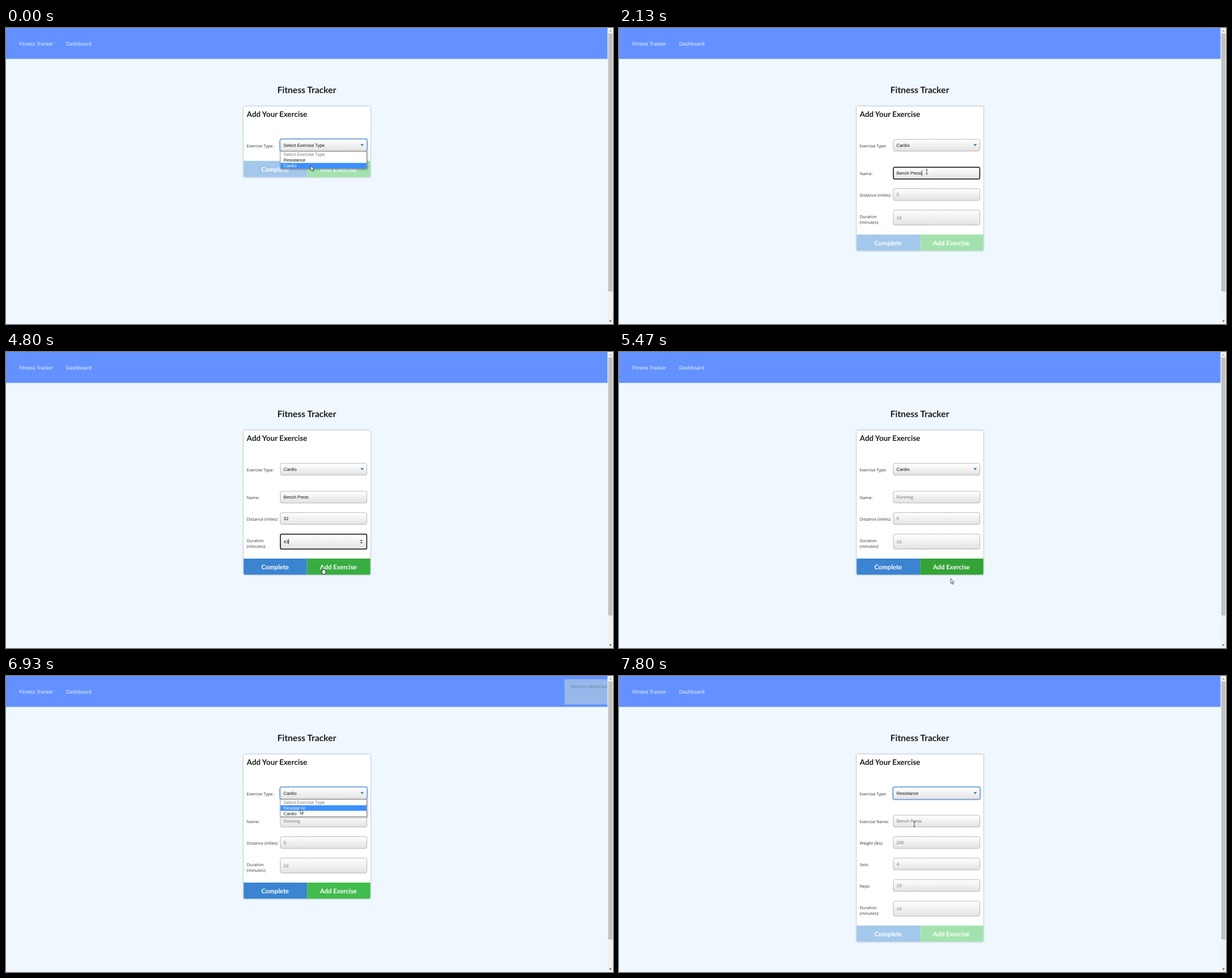
An HTML page for the animation above (8 s loop, 1071 by 523 pixels).

```html
<!DOCTYPE html>
<html lang="en">
<head>
<meta charset="utf-8">
<title>Fitness Tracker</title>
<style>
  html, body { margin: 0; width: 100%; height: 100%; overflow: hidden; background: #f0f8ff; }
  svg { display: block; width: 100%; height: 100%; }
  text { text-rendering: geometricPrecision; white-space: pre; }
  .ui { font-family: "Open Sans", "Noto Sans", sans-serif; }
  .head { font-family: Lato, sans-serif; font-weight: 700; }
  .field { font: 7.8px "Liberation Sans", Arial, sans-serif; }
  .card { filter: drop-shadow(0 .8px 1.4px rgba(40, 40, 60, .45)); }
  .menu { filter: drop-shadow(1px 1.5px 1.5px rgba(0, 0, 0, .4)); }
</style>
</head>
<body>
<svg id="stage" viewBox="0 0 1071 523" preserveAspectRatio="none">
  <defs>
    <linearGradient id="face" x2="0" y2="1">
      <stop offset="0" stop-color="#fff"/>
      <stop offset="1" stop-color="#e3e3e3"/>
    </linearGradient>
  </defs>
  <rect width="1071" height="523" fill="#f0f8ff"/>
  <rect width="1061.5" height="54.6" fill="#6391ff"/>
  <g class="ui" font-size="8.7" fill="#fff">
    <text x="23.4" y="31">Fitness Tracker</text>
    <text x="106" y="31">Dashboard</text>
  </g>
  <text class="head" x="530.6" y="115.3" font-size="15.6" text-anchor="middle" fill="#1b1c1d">Fitness Tracker</text>
  <g id="form"></g>
  <g id="toast">
    <rect x="888.7" y="5.6" width="167.4" height="44.6" rx="2" fill="#dbead0"/>
    <text class="ui" x="899.8" y="20.7" font-size="6.92" fill="#4a6b2a">Workout Added Successfully!</text>
  </g>
  <rect x="1061.6" width="9.4" height="523" fill="#f1f1f1"/>
  <rect x="1062.7" y="9.5" width="7.3" height="456" fill="#c1c1c1"/>
  <path d="M1064.2 6.2l2.2-2.6 2.2 2.6z" fill="#a3a3a3"/>
  <path d="M1064.2 516.8l2.2 2.6 2.2-2.6z" fill="#505050"/>
  <g id="cursor"></g>
</svg>
<script>
const LOOP = 8000, RATE = 15;
const $ = id => document.getElementById(id);
const clamp = v => Math.max(0, Math.min(1, v));

// Moments of the story, counted in ticks of 1/15 s
const PICK_CARDIO = 9, NAME_FOCUS = 23, NAME_FILL = 32, DIST_FOCUS = 41, DUR_FOCUS = 60,
      READY = 65, SUBMIT = 78, CLEAR = 80, REOPEN = 100, PICK_RESIST = 106;

// Pointer hotspot: tick, x, y
const PATH = [
  [0, 537.5, 243], [1, 546, 242], [2, 537.5, 241.5], [5, 537.5, 241.5], [6, 548, 240.8],
  [18, 548, 240.8], [24, 543, 254], [36, 543, 254], [41, 542, 294.5], [54, 542, 294.5],
  [55, 542, 294.8], [60, 541, 346], [69, 541, 346], [70, 544, 351], [72, 559, 380.5],
  [75, 609, 383.7], [78, 608, 383.7], [80, 602, 388], [82, 585, 400], [85, 545, 413],
  [88, 500, 409], [90, 480, 401], [92, 480, 401], [93, 474, 380], [94, 464, 330],
  [95, 457, 275], [96, 475, 234], [98, 492, 216], [99, 508, 209], [100, 515, 208],
  [101, 516, 211], [104, 519, 235], [106, 519.3, 236], [112, 521, 265], [114, 521, 265],
  [115, 521, 264], [117, 521, 262]
];

function pointer(n) {
  const i = PATH.findIndex(k => k[0] > n);
  if (i < 0) return PATH[PATH.length - 1].slice(1);
  const [a, ax, ay] = PATH[i - 1], [b, bx, by] = PATH[i];
  const p = (n - a) / (b - a);
  return [ax + (bx - ax) * p, ay + (by - ay) * p];
}

const rect = (x, y, w, h, fill, more = '') =>
  `<rect x="${x}" y="${y}" width="${w}" height="${h}" fill="${fill}" ${more}/>`;
const text = (x, y, str, cls, more = '') =>
  `<text x="${x}" y="${y}" class="${cls}" ${more}>${str}</text>`;
const label = (y, str) => text(424.8, y, str, 'ui', 'font-size="7.3" fill="#333"');
const box = (y, h) => rect(484, y, 152.7, h, 'url(#face)', 'rx="3" stroke="#a6a6a6" stroke-width=".8"');

function field(f, hover) {
  const mid = f.y + f.h / 2;
  let out = f.label.map((s, i) => label(f.y + 14 + i * 10.6, s)).join('') + box(f.y, f.h);
  out += text(489.8, mid + 2.7, f.value || f.hint, 'field', `fill="${f.value ? '#111' : '#777'}"`);
  if (f.focus) {
    out += rect(484.2, f.y, 152.3, f.h, 'none', 'rx="2.2" stroke="#101010" stroke-width="1.5"');
    out += rect(490 + (f.caret || 0), mid - 4.9, .8, 9.6, '#111');
  }
  if (f.number && (f.focus || hover))
    out += `<path d="M624.6 ${mid - 1}l2.4-2.6 2.4 2.6zM624.6 ${mid + 1}l2.4 2.6 2.4-2.6z" fill="#505050"/>`;
  return out;
}

function fields(n) {
  if (n < PICK_CARDIO) return [];
  const number = true, tall = ['Duration', '(minutes):'];
  if (n >= PICK_RESIST) return [
    { y: 246, h: 20.8, label: ['Exercise Name:'], hint: 'Bench Press' },
    { y: 283.8, h: 20.8, label: ['Weight (lbs):'], hint: '200', number },
    { y: 321.8, h: 20.8, label: ['Sets:'], hint: '4', number },
    { y: 359.8, h: 20.8, label: ['Reps:'], hint: '10', number },
    { y: 397.8, h: 26.4, label: tall, hint: '10', number }
  ];
  const kept = n < CLEAR;
  const name = kept && n >= NAME_FILL ? 'Bench Press' : '';
  const dist = kept ? '32'.slice(0, n < 49 ? 0 : n < 52 ? 1 : 2) : '';
  const dur = kept ? '43'.slice(0, n < READY ? 0 : n < READY + 1 ? 1 : 2) : '';
  const within = (a, b) => n >= a && n < b;
  return [
    { y: 246, h: 20.8, label: ['Name:'], hint: 'Running', value: name,
      focus: within(NAME_FOCUS, DIST_FOCUS), caret: name && 44.2 },
    { y: 283.8, h: 20.8, label: ['Distance (miles):'], hint: '5', value: dist, number,
      focus: within(DIST_FOCUS, DUR_FOCUS), caret: dist.length * 4.2 },
    { y: 321.8, h: 26.4, label: tall, hint: '10', value: dur, number,
      focus: within(DUR_FOCUS, SUBMIT), caret: dur.length * 4.2 }
  ];
}

function select(n) {
  const value = n < PICK_CARDIO ? 'Select Exercise Type' : n < PICK_RESIST ? 'Cardio' : 'Resistance';
  let out = label(210.6, 'Exercise Type:');
  if (n < NAME_FOCUS || n >= REOPEN)
    out += rect(483.2, 196, 154.3, 22.2, 'none', 'rx="3.4" stroke="#3b99fc" stroke-opacity=".8" stroke-width="2"');
  return out + box(196.7, 20.8) + text(489.8, 209.9, value, 'field', 'fill="#111"') +
    '<path d="M625.4 205.3h6l-3 3.4z" fill="#1f7fbd"/>';
}

function menu(y) {
  const row = y >= 228.3 && y < 238.3 ? 1 : 2;
  let out = rect(484, 218, 152.3, 30.6, '#fff', 'class="menu" stroke="#777" stroke-width=".7"');
  out += rect(484.4, 218.4 + row * 10, 151.5, 9.8, '#3c90ff');
  ['Select Exercise Type', 'Resistance', 'Cardio'].forEach((s, i) => {
    const fill = i === row ? '#fff' : i ? '#111' : '#777';
    out += text(489.8, 225.8 + i * 10, s, 'field', `fill="${fill}"`);
  });
  return out;
}

function buttons(n, y) {
  const on = n >= READY && n < PICK_RESIST;
  const green = !on ? '#a3e2ae' : n < SUBMIT ? '#38ad42' : n < REOPEN ? '#33a337' : '#41bc4d';
  const caption = (x, s) =>
    text(x, y + 18.8, s, 'head', 'font-size="11.3" text-anchor="middle" fill="#fff"');
  return `<path d="M419.3 ${y}h112v28.6h-110q-2 0-2-2z" fill="${on ? '#3b84d1' : '#a3c8ec'}"/>` +
    `<path d="M531.3 ${y}h111.5v26.6q0 2-2 2h-109.5z" fill="${green}"/>` +
    caption(474.8, 'Complete') + caption(586.5, 'Add Exercise');
}

const SHAPES = {
  arrow: '<path d="M.3 .3V9L2.3 7.2 3.6 10.3 4.9 9.7 3.7 6.7H6.3Z" fill="#fff" stroke="#111" stroke-width=".7"/>',
  beam: '<path d="M-1.7-4.2H-.5L0-3.8 .5-4.2H1.7M0-3.8V3.8M-1.7 4.2H-.5L0 3.8 .5 4.2H1.7" fill="none" stroke="#222" stroke-width=".8"/>',
  hand: '<path d="M-.9 .8Q0-.4 .9 .8V4.2L4.4 5Q5.4 5.4 5.3 6.6L4.6 9.8V12H-.4V10.6L-2.9 7.4Q-3 6 -1.8 6.4L-.9 7.2Z" fill="#fff" stroke="#111" stroke-width=".8"/>'
};

function draw(n) {
  const [x, y] = pointer(n);
  const list = fields(n);
  const foot = n < PICK_CARDIO ? 234.8 : n < PICK_RESIST ? 365 : 441;
  const open = n < PICK_CARDIO || (n >= REOPEN && n < PICK_RESIST);
  const over = f => !open && x > 484 && x < 637 && y > f.y && y < f.y + f.h;

  $('form').innerHTML =
    rect(419.3, 138.4, 223.5, foot + 28.6 - 138.4, '#fff', 'rx="2" class="card"') +
    text(424.8, 157.3, 'Add Your Exercise', 'head', 'font-size="13.4" fill="#1b1c1d"') +
    select(n) + list.map(f => field(f, over(f))).join('') + buttons(n, foot) + (open ? menu(y) : '');

  // The notice slides in from the right and leaves the same way
  const shown = clamp((n - 82) / 8) * (1 - clamp((n - 99.5) / 8));
  $('toast').setAttribute('transform', `translate(${(1 - shown) * 172} 0)`);
  $('toast').setAttribute('opacity', shown);

  const live = n >= READY && n < PICK_RESIST;
  const onButton = live && x > 419 && x < 643 && y > foot && y < foot + 28.6;
  const kind = list.some(over) ? 'beam' : onButton ? 'hand' : 'arrow';
  $('cursor').innerHTML = SHAPES[kind];
  $('cursor').setAttribute('transform', `translate(${x} ${y})`);
}

const start = performance.now();
let last = -1;
function tick(now) {
  const t = Math.max(0, now - start) % LOOP;
  const n = Math.floor(t * RATE / 1000 + .1) % (LOOP * RATE / 1000);
  if (n !== last) draw(last = n);
  requestAnimationFrame(tick);
}
tick(start);
</script>
</body>
</html>
```
